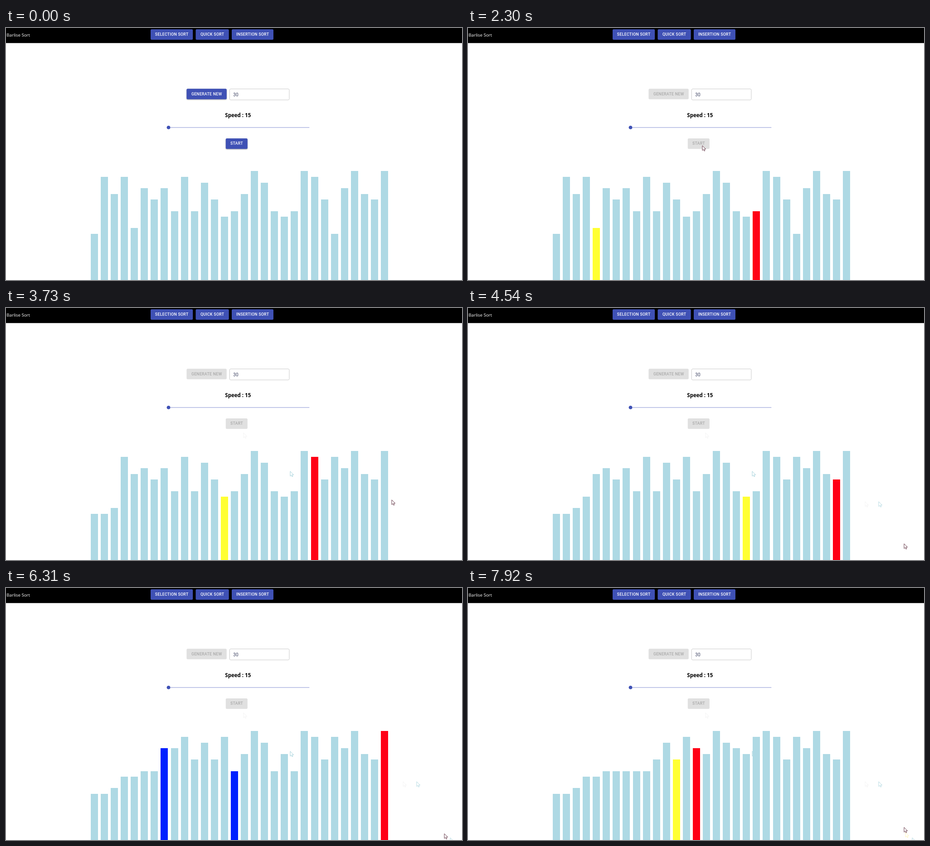
An HTML page that plays this animation: 1006x557 px, repeating every 8000 ms.

```html
<!DOCTYPE html>
<html lang="en">
<head>
<meta charset="utf-8">
<title>Selection sort</title>
<style>
  html, body { margin: 0; width: 100%; height: 100%; overflow: hidden; background: #fff; }
  svg { display: block; width: 1006px; height: 557px; }
  .btn text { font: 500 8.82px Roboto, sans-serif; letter-spacing: .0286em; text-anchor: middle; fill: #fff; }
  .btn rect { fill: #3f51b5; }
  .raised rect { filter: drop-shadow(0 1px 1px rgba(0, 0, 0, .38)); }
  .off rect { filter: none; }
  .off text { fill: #a9a9a9; }
  .title { font: 9.7px "Open Sans", sans-serif; fill: #fff; }
  .speed { font: 700 11.5px "Open Sans", sans-serif; text-anchor: middle; }
  .field { font: 10.1px Roboto, sans-serif; fill: #3b4060; }
</style>
</head>
<body>
<svg id="stage" viewBox="0 0 1006 557"></svg>
<script>
const LOOP = 8000, TICK = 67.7, LEAD = 130, COUNT = 30;
const HOVER = 8, CLICK = 15;
const VALUES = [9, 19, 16, 19, 10, 17, 15, 17, 13, 19, 13, 18, 15, 12, 13,
  16, 20, 18, 13, 12, 13, 20, 19, 15, 9, 17, 20, 16, 15, 20];
const COLOR = { idle: '#aed9e4', scan: '#ff0016', min: '#ffff33', swap: '#0020ff' };

// tick -> sort step
const PACE = [[15, 1], [23, 22], [32, 49], [53, 106], [76, 168], [91, 212], [107, 255.2], [115, 278]];
// tick -> pointer tip
const POINTER = [[0, 970, 541], [4, 715, 385], [8, 517, 260], [37, 517, 260], [40, 524, 276],
  [44, 627, 361], [50, 846, 424], [53, 851, 424], [59, 876, 428], [62, 906, 428], [66, 980, 552],
  [68, 984, 572], [86, 972, 572], [91, 967, 543], [94, 962, 533], [115, 962, 529]];
// faint marks the pointer leaves: x, y, first tick, colour, opacity
const TRAIL = [[524, 276, 41, '#888', .1], [627, 361, 45, '#8cc6d2', .85], [876, 428, 60, '#888', .1],
  [906, 428, 63, '#8cc6d2', .7], [980, 552, 67, '#8cc6d2', .7], [965, 540, 93, '#ffee90', .6]];

const ARROW = 'M0 0V10.6L2.5 8.4 4.1 12 5.9 11.2 4.3 7.7H7.6Z';
const HAND = 'M-1 .8Q0-.4 1 .8V5.2L2.3 4.9 3.4 5.5 4.6 5.4 5.6 6.2 6.2 7V10L5 12.2V14H-.4V12.6L-3.4 8.4Q-3.2 6.8-1.9 7.7L-1 8.6Z';

const stage = document.getElementById('stage');

function add(tag, attrs, parent = stage, text = '') {
  const el = document.createElementNS('http://www.w3.org/2000/svg', tag);
  for (const key in attrs) el.setAttribute(key, attrs[key]);
  el.textContent = text;
  parent.append(el);
  return el;
}

function button(label, x, y, width, raised) {
  const g = add('g', { class: raised ? 'btn raised' : 'btn' });
  const box = add('rect', { x, y, width, height: 23.2, rx: 2.5 }, g);
  add('text', { x: x + width / 2 + .1, y: y + 14.2 }, g, label);
  return { g, box };
}

const clamp = v => Math.max(0, Math.min(1, v));
const mix = (a, b, p) => `rgb(${a.map((v, i) => Math.round(v + (b[i] - v) * p))})`;

// Linear lookup in a table of [tick, ...values], held at both ends.
function lookup(table, tick) {
  const n = table.findIndex(row => row[0] > tick);
  if (n === 0) return table[0].slice(1);
  if (n < 0) return table[table.length - 1].slice(1);
  const a = table[n - 1], b = table[n], p = (tick - a[0]) / (b[0] - a[0]);
  return a.slice(1).map((v, i) => v + (b[i + 1] - v) * p);
}

function selectionSort(values) {
  const list = values.slice();
  let marked = 0;
  const steps = [];
  const log = (scan, pair = []) => steps.push({ list: list.slice(), scan, min: marked, pair });
  log(-1);
  for (let i = 0; i < COUNT - 1; i++) {
    let min = i;
    for (let j = i + 1; j < COUNT; j++) {
      if (list[j] < list[min]) marked = min = j;
      log(j);
    }
    log(COUNT - 1, [i, min]);
    [list[i], list[min]] = [list[min], list[i]];
  }
  return steps;
}

add('rect', { width: 1006, height: 33.3 });
add('text', { class: 'title', x: 1.3, y: 19 }, stage, 'Barlise Sort');
button('SELECTION SORT', 319, 2.8, 93.2);
button('QUICK SORT', 418.5, 2.8, 73.2);
button('INSERTION SORT', 498, 2.8, 92);
const generate = button('GENERATE NEW', 398.4, 134.3, 88.4, true);
add('rect', { x: 493.3, y: 134.7, width: 131.6, height: 24.3, rx: 2.5, fill: '#fff', stroke: '#c4c4c4', 'stroke-width': .9 });
add('text', { class: 'field', x: 501.3, y: 150.6 }, stage, '30');
add('text', { class: 'speed', x: 511.8, y: 196.5 }, stage, 'Speed : 15');
add('rect', { x: 354, y: 219.2, width: 315.3, height: 1.4, fill: '#3f51b5', opacity: .45 });
add('circle', { cx: 358.6, cy: 219.9, r: 3.8, fill: '#3f51b5' });
const start = button('START', 484.8, 244, 48, true);

const trail = TRAIL.map(([x, y, from, stroke, opacity]) => ({
  from,
  el: add('path', { d: ARROW, transform: `translate(${x} ${y})`, fill: 'none', stroke, opacity, 'stroke-width': .9 })
}));
const bars = VALUES.map((_, i) => add('rect', { x: Math.round(187 + 22.07 * i), width: 16 }));
const pointer = add('path', { fill: '#fff', 'stroke-width': .9, 'stroke-linejoin': 'round' });

const steps = selectionSort(VALUES);
const idle = { list: VALUES, scan: -1, min: -1, pair: [] };

function drawBars(step) {
  bars.forEach((bar, i) => {
    const top = Math.round(316.4 + 12.6 * (20 - step.list[i]));
    const kind = step.pair.includes(i) ? 'swap' : i === step.scan ? 'scan' : i === step.min ? 'min' : 'idle';
    bar.setAttribute('y', top);
    bar.setAttribute('height', 557 - top);
    bar.setAttribute('fill', COLOR[kind]);
  });
}

function drawButtons(tick) {
  const blue = [63, 81, 181], dark = [48, 63, 159], grey = [224, 224, 224];
  const hover = clamp((tick - HOVER + 1) / 4), off = clamp((tick - CLICK + 1) / 4);
  const running = tick >= CLICK;
  generate.box.style.fill = mix(blue, grey, off);
  start.box.style.fill = running ? mix(dark, grey, off) : mix(blue, dark, hover);
  for (const b of [generate, start]) b.g.classList.toggle('off', running);
}

function drawPointer(tick) {
  const [x, y] = lookup(POINTER, tick);
  const hand = tick >= HOVER && tick < CLICK;
  pointer.setAttribute('d', hand ? HAND : ARROW);
  pointer.setAttribute('stroke', hand ? '#222' : '#5a2a3a');
  pointer.setAttribute('transform', `translate(${Math.round(x)} ${Math.round(y)})`);
  pointer.setAttribute('visibility', tick < 0 ? 'hidden' : 'visible');
  for (const mark of trail) mark.el.setAttribute('visibility', tick < mark.from ? 'hidden' : 'visible');
}

let shown = null;
function frame() {
  const tick = Math.floor((performance.now() % LOOP - LEAD) / TICK);
  if (tick !== shown) {
    shown = tick;
    drawBars(tick < CLICK ? idle : steps[Math.floor(lookup(PACE, tick)[0] + 1e-6)]);
    drawButtons(tick);
    drawPointer(tick);
  }
  requestAnimationFrame(frame);
}
frame();
</script>
</body>
</html>
```
